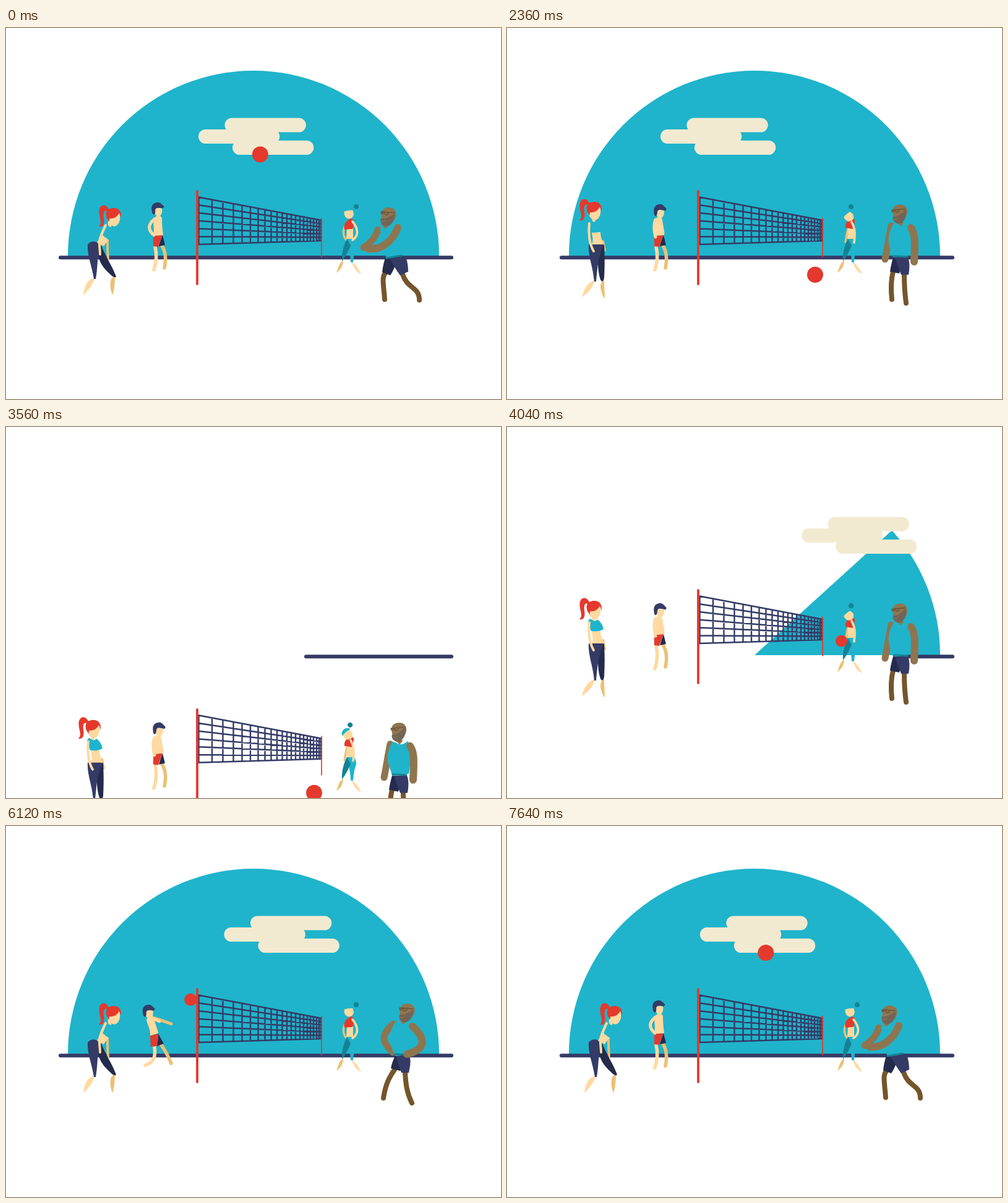
These frames come from a looping animation (800 by 600 pixels, 7680 ms). An HTML page:

```html
<!DOCTYPE html>
<html lang="en">
<head>
<meta charset="utf-8">
<title>Beach volleyball</title>
<style>
  html, body { margin: 0; width: 100%; height: 100%; overflow: hidden; background: #fff; }
  svg { display: block; width: 800px; height: 600px; }
</style>
</head>
<body>
<svg id="stage" viewBox="0 0 800 600"></svg>
<script>
const LOOP = 7680;
const RED = '#e4392c', NAVY = '#343b66', DARK = '#242b4d', TEAL = '#1fb4cb', DEEP = '#158294';
const SKIN = '#ffd9a0', SHADE = '#ecc074', BROWN = '#8f754f', LEG = '#75552b', BEARD = '#746457';

const stage = document.getElementById('stage');
const clamp = v => Math.min(1, Math.max(0, v));
const span = (t, a, b) => clamp((t - a) / (b - a));
const smooth = u => u * u * (3 - 2 * u);
const inOut = u => u < .5 ? 2 * u * u : 1 - 2 * (1 - u) ** 2;

function el(tag, attrs, parent = stage) {
  const node = document.createElementNS('http://www.w3.org/2000/svg', tag);
  for (const k in attrs) node.setAttribute(k, attrs[k]);
  parent.appendChild(node);
  return node;
}

// A style is "colour" for a fill or "colour width" for a round stroke.
function shape(style, d, parent) {
  const [color, width] = style.split(' ');
  const paint = width
    ? { fill: 'none', stroke: color, 'stroke-width': width, 'stroke-linecap': 'round', 'stroke-linejoin': 'round' }
    : { fill: color };
  return el('path', { ...paint, d }, parent);
}

const at = (x, y, r = 0) => `translate(${x} ${y}) rotate(${r})`;

function mix(a, b, k) {
  if (a === b || k <= 0) return a;
  if (k >= 1) return b;
  const to = b.match(/-?[\d.]+/g);
  let i = 0;
  return a.replace(/-?[\d.]+/g, n => (+n + (to[i++] - n) * k).toFixed(2));
}

// Backdrop
const sky = shape(TEAL, '');
const cloud = el('g', { fill: '#f2ead0' });
for (const [x, y] of [[42.5, 145.5], [0, 164], [55, 182]])
  el('rect', { x, y, width: 131.3, height: 23, rx: 11.5 }, cloud);
const ground = shape(NAVY + ' 6', '');
const court = el('g', {});

// Each figure: styles of its parts (an array means a rigid head), poses, and blends [start, end, pose].
const redhead = {
  styles: [SHADE + ' 4', SHADE, DARK, SKIN, NAVY, SKIN, SKIN + ' 5', TEAL, [
    [RED, 'M-8 -13C-13 -23 -22 -21 -23.5 -11C-24 2 -17 9 -24 15C-17 17 -14 10 -16 1C-17 -8 -15 -13 -9 -9Z'],
    [SKIN, 'M-10 0C-7 -6 6 -9 9 -7C12 0 10 10 4 14C-2 17 -9 10 -10 0Z'],
    [RED, 'M-12 -2C-14 -10 -8 -15 0 -15C8 -15 13 -10 12 1L9 -7C6 0 -1 3 -7 2L-7 7C-10 4 -12 1 -12 -2Z']
  ], SKIN + ' 4'],
  poses: {
    ready: [
      'M164 343C164 353 164 363 165 373',
      'M176 402C168 402 166 416 172 432C175 424 176 412 176 402Z',
      'M148 353L154 352C160 368 172 385 178 402C176 405 172 402 168 398C158 388 147 378 148 353Z',
      'M143 405C132 405 126 418 125 432C133 424 140 416 143 405Z',
      'M132 350C136 345 142 344 148 347L150 353C148 370 148 390 145 406L142 406C139 385 131 368 132 350Z',
      'M154 333L166 343C162 346 160 350 158 353L147 347C150 342 152 338 154 333Z',
      'M167 315L168 321',
      'M160 317L165 319C167 323 171 322 173 320C173 328 172 336 167 343C162 340 157 336 154 333C156 326 158 321 160 317Z',
      at(174, 306), 'M161 319C156 330 150 342 151 349C151 355 152 360 152 366'],
    reach: [
      'M176 333C182 346 190 352 198 356',
      'M178 402C170 402 169 418 176 433C179 424 179 412 178 402Z',
      'M148 354L157 350C163 365 175 385 181 401C179 405 172 400 168 397C160 390 146 380 146 372Z',
      'M133 403C122 404 116 418 114 431C123 424 130 415 133 403Z',
      'M133 349C137 344 146 345 152 347L153 355C147 372 142 390 136 404L132 404C132 385 132 368 133 349Z',
      'M153 332L167 342C163 347 160 351 157 355L146 346C149 342 151 337 153 332Z',
      'M168 315L170 321',
      'M162 317L167 319C169 323 173 322 175 320C176 328 173 336 168 343C163 340 157 336 153 332C156 326 159 321 162 317Z',
      at(173, 307, -4), 'M164 319C166 334 174 343 181 348C187 353 192 355 198 357'],
    stand: [
      'M155 345C156 350 157 355 158 359',
      'M157 408C149 410 149 424 158 438C158 428 157 418 157 408Z',
      'M148 358L157 350C158 370 158 385 157 404C156 411 153 411 151 407C147 395 146 380 148 358Z',
      'M142 408C131 410 124 422 121 435C131 429 139 420 142 408Z',
      'M132 350C137 349 148 348 156 350L154 356C147 372 146 390 144 410L141 410C139 385 131 370 132 350Z',
      'M137 331L151 330C151 338 154 345 157 350L137 350C140 343 138 337 137 331Z',
      'M140 307L140 312',
      'M134 310L138 312C140 315 144 314 146 311C151 315 155 320 156 327C150 331 142 331 136 330C134 324 131 318 131 314Z',
      at(141, 296), 'M133 316C132 324 132 330 133 338C134 347 136 354 140 361']
  },
  first: 'ready',
  blends: [[100, 780, 'reach'], [1200, 1840, 'stand'], [4100, 4780, 'ready']]
};

const hips = [
  'M252 352C258 362 259 375 256 388', 'M241 354C245 370 242 382 239 391',
  'M253 335L257 351L247 353C249 346 251 340 253 335Z',
  'M238 336L253 335C250 342 248 348 246 354L238 353Z'];
const boy = {
  styles: [SHADE + ' 5', SHADE + ' 5.5', SKIN + ' 5.5', DARK, RED, SKIN, [
    [SKIN, 'M-5 1C-1 -3 4 -2 7 -1C8 6 6 11 1 12C-3 11 -5 7 -5 1Z'],
    [NAVY, 'M-9 4C-12 -6 -6 -11 0 -11C5 -11 6 -8 10 -5C11 -2 8 -1 5 -2C2 -2 -1 -3 -3 -1C-5 3 -2 6 -6 9C-8 8 -9 6 -9 4Z']
  ], SKIN + ' 5'],
  poses: {
    ready: ['M246 310C247 320 247 326 247 332', ...hips,
      'M240 307C243 303 249 302 252 307C252 318 253 327 254 335L238 336C241 326 236 316 240 307Z',
      at(245, 293), 'M240 309C229 318 229 326 239 335'],
    stand: ['M248 312C250 320 251 326 252 332', ...hips,
      'M239 309C243 305 249 304 251 310C252 320 255 328 254 335L238 336C241 326 237 318 239 309Z',
      at(247, 296, 6), 'M240 310C236 320 238 330 240 338'],
    hit: ['M237 310C247 313 257 316 267 320',
      'M250 353C257 362 262 372 267 384', 'M240 357C242 372 240 382 225 387',
      'M246 336L255 352L244 356C245 350 246 343 246 336Z',
      'M233 339L246 336C246 345 245 350 244 356L234 357Z',
      'M227 313C230 308 236 307 239 311C241 320 245 328 246 335L233 339C234 328 228 322 227 313Z',
      at(230.5, 300), 'M236 311C240 313 244 314 248 316']
  },
  first: 'ready',
  blends: [[1250, 1900, 'stand'], [4100, 4780, 'ready'], [5450, 5980, 'hit'], [6300, 7000, 'ready']]
};

const stride = [
  'M545 376C538 380 537 388 534 396C541 391 545 385 545 376Z',
  'M559 378C565 382 570 390 574 398C567 395 561 388 559 378Z',
  'M551 341L563 341C566 348 567 352 565 356C562 364 562 372 561 379L557 379C557 368 554 355 551 341Z',
  'M551 341L557 352C552 364 547 372 543 377C542 365 546 350 551 341Z'];
const server = {
  styles: [SHADE + ' 3.4', SHADE, SKIN, TEAL, DEEP, SKIN, RED, [
    [SKIN, 'M-7 -3C-2 -5 3 -4 6 -5L8 2C7 9 0 12 -5 7C-7 5 -8 0 -7 -3Z'],
    [TEAL, 'M-8 -2C-7 -10 4 -13 9 -4C5 -4 0 -5 -8 -2Z'],
    [DEEP, 'M8 -10A4 4 0 1 1 16 -10A4 4 0 1 1 8 -10Z']
  ], SKIN + ' 3.6'],
  poses: {
    ready: ['M547 322C544 330 545 337 550 343', ...stride,
      'M551 325L561 324L561 341L550 341Z',
      'M557 308L562 310C562 318 561 323 560 325L547 326C545 319 548 313 557 308Z',
      at(554, 299), 'M560 313C570 325 570 336 560 343'],
    stand: ['M551 325C549 333 548 340 547 346', ...stride,
      'M551 324L561 322L563 341L550 341Z',
      'M557 308L562 310C562 318 560 323 559 325L547 323C546 316 550 311 557 308Z',
      at(551.5, 304, -33), 'M557 314C564 326 562 338 561 347'],
    serve: ['M537 330C534 338 530 346 526 352',
      'M546 376C539 380 541 390 538 397C544 392 546 385 546 376Z',
      'M551 377C557 382 562 388 563 396C557 392 553 386 551 377Z',
      'M550 346L563 343C562 350 560 354 558 358C556 365 554 372 552 378L548 378C549 366 549 356 550 346Z',
      'M549 345L553 350C554 360 551 370 548 377C541 376 541 360 549 345Z',
      'M541 334L549 325L563 343L551 345Z',
      'M537 316L549 318C549 324 545 330 541 336L534 333C533 326 534 320 537 316Z',
      at(531, 310, -16), 'M541 320C542 335 536 348 527 354']
  },
  first: 'ready',
  blends: [[1250, 2050, 'stand'], [4150, 4780, 'serve'], [4880, 5500, 'ready']]
};

const upright = [
  'M621 320C616 345 614 360 611 374',
  'M624 394C621 405 620 420 622 439', 'M642 398C642 412 643 430 645 445',
  'M624 371L640 372C638 380 636 390 634 397L619 394C620 386 622 378 624 371Z',
  'M626 371L648 371C651 378 651 388 649 399L637 399C634 391 630 382 628 374Z',
  'M625 316L631 318C637 323 644 320 649 315C655 328 655 350 651 368L624 371C622 358 608 345 625 316Z',
  'M630 314L642 314L636 321Z', 'M625 369L647 370'];
const rightArm = 'M653 323C661 335 659 350 658 378';
const man = {
  styles: [BROWN + ' 11', LEG + ' 8', LEG + ' 8', DARK, NAVY, TEAL, BROWN, DEEP + ' 3', [
    [BROWN, 'M-11 -4C-11 -14 -2 -15 2 -15C10 -15 14 -9 13 -2C12 5 8 10 2 12L-9 8Z'],
    [BEARD, 'M10 -8C13 2 9 14 0 16C-7 16 -12 10 -10 4C-5 6 0 2 2 0C6 -1 8 -5 10 -8Z'],
    [BROWN + ' 1.4', 'M-8 8C-6 10 -3 9 -2 7'],
    ['#675238 1.3', 'M-12 -6L9 -8M-12 -6C-12 -2 -8 -2 -8 -6M-6 -6C-6 -1 0 -1 0 -7']
  ], BROWN + ' 12'],
  poses: {
    hit: ['M601 326C598 338 590 347 578 355',
      'M613 396C607 404 610 412 612 439', 'M641 398C648 422 668 418 668 440',
      'M614 369L632 374C629 385 626 393 621 400L608 395C609 385 611 377 614 369Z',
      'M618 372L646 370C649 378 650 386 650 394L637 400C632 393 626 384 622 376Z',
      'M604 325L613 320C618 326 624 324 629 318C638 330 640 350 640 368L614 373C614 360 612 345 604 325Z',
      'M606 317L621 317L613 325Z', 'M615 372L639 368',
      at(617, 305, 10), 'M633 323C626 342 608 360 586 357'],
    watch: [...upright, at(641.5, 297.5, 12), rightArm],
    stand: [...upright, at(634, 300.5), rightArm],
    rest: ['M626 320C603 340 610 352 625 366',
      'M628 394C618 408 613 420 610 440', 'M645 398C646 418 648 432 656 448',
      'M629 371L645 373C643 382 640 390 637 396L622 392C623 385 626 378 629 371Z',
      'M631 371L652 371C655 380 653 390 651 399L639 399C636 391 632 382 631 374Z',
      'M629 317L636 319C643 323 649 321 655 317C664 332 658 352 652 370L629 372C624 358 612 345 629 317Z',
      'M636 314L650 314L642 321Z', 'M629 369L651 370',
      at(647, 302, 10), 'M657 324C683 348 674 362 648 369']
  },
  first: 'hit',
  blends: [[0, 780, 'watch'], [900, 2100, 'stand'], [4100, 4600, 'watch'], [4600, 5300, 'rest'], [6500, 7160, 'hit']]
};

const team = [boy, server, redhead, man];

function build(fig) {
  const root = el('g', {}, court);
  fig.nodes = fig.styles.map(style => {
    if (typeof style === 'string') return [shape(style, '', root), 'd'];
    const head = el('g', {}, root);
    style.forEach(([s, d]) => shape(s, d, head));
    return [head, 'transform'];
  });
}

function pose(fig, t) {
  let from = fig.poses[fig.first], to = from, k = 0;
  for (const [start, end, name] of fig.blends) {
    if (t < start) break;
    from = to;
    to = fig.poses[name];
    k = smooth(span(t, start, end));
  }
  fig.nodes.forEach(([node, attr], i) => node.setAttribute(attr, mix(from[i], to[i], k)));
}

function buildNet() {
  const topY = x => 273.5 + (x - 311) * 37.5 / 199;
  const lowY = x => 350 - (x - 311) * 6 / 199;
  let d = '';
  for (let i = 0; i <= 6; i++) d += `M311 ${273.5 + i * 12.75}L510 ${311 + i * 5.5}`;
  for (const x of [311.5, 333, 350.5, 367.5, 381.5, 395, 407.5, 418.5, 428.5, 438, 446.5, 454, 461, 468, 475, 481, 487, 492, 497, 502, 506, 509])
    d += `M${x} ${topY(x)}L${x} ${lowY(x)}`;
  shape(NAVY + ' 2.4', d, court);
  shape(RED + ' 1.7', 'M510 307.5L510 370', court);
  shape(RED + ' 3.8', 'M309 264L309 414', court);
}

build(boy);
build(server);
buildNet();
build(redhead);
build(man);
const ball = el('circle', { fill: RED }, court);

// Ball flights: each is a run of [time, x, y, radius].
const flights = [
  [[-550, 572, 345, 12.5], [-480, 541, 312, 12.7], [-40, 418.5, 205, 13], [0, 411, 204.5, 13], [800, 319, 247, 13], [1160, 205, 345, 13]],
  [[1160, 205, 345, 13], [1500, 310, 195, 13], [1700, 385, 225, 13], [1930, 468, 399, 13]],
  [[1930, 468, 399, 13], [2065, 484, 378, 13], [2200, 498, 399, 13]],
  [[2200, 498, 399, 13], [3725, 498, 399, 13]],
  [[3725, 540, 346, 9.5], [4100, 540, 346, 9.5], [4800, 520, 344, 9.5]],
  [[4800, 520, 344, 9.5], [5300, 425, 205, 9.7], [5950, 272, 312, 10]],
  [[5950, 272, 312, 10], [6120, 298, 281, 10], [6600, 425, 190, 11.3], [7130, 572, 345, 12.5]]
];

function flight(keys, t, c) {
  const n = keys.length - 1;
  const gap = i => keys[i + 1][0] - keys[i][0];
  const rate = i => (keys[i + 1][c] - keys[i][c]) / gap(i);
  const inner = i => (rate(i - 1) * gap(i) + rate(i) * gap(i - 1)) / (gap(i - 1) + gap(i));
  const slope = i => {
    if (n === 1) return rate(0);
    if (i === 0) return 1.5 * rate(0) - .5 * inner(1);
    if (i === n) return 1.5 * rate(n - 1) - .5 * inner(n - 1);
    return inner(i);
  };
  let i = 0;
  while (i < n - 1 && t >= keys[i + 1][0]) i++;
  const h = gap(i), u = (t - keys[i][0]) / h, v = 1 - u;
  return v * v * (1 + 2 * u) * keys[i][c] + u * u * (3 - 2 * u) * keys[i + 1][c]
    + h * u * v * (v * slope(i) - u * slope(i + 1));
}

function moveBall(t) {
  const time = t >= 7130 ? t - LOOP : t;
  const keys = flights.find(f => time < f[f.length - 1][0]);
  ['cx', 'cy', 'r'].forEach((name, i) => ball.setAttribute(name, flight(keys, time, i + 1)));
}

function cloudX(t) {
  if (t < 3650) return 311 - .0267 * t - .003 * Math.max(0, t - 3180) ** 2;
  return 352.5 - .0267 * (t - 6120) + 382 * Math.exp((3650 - t) / 200)
    + 14 * (1 - smooth(span(t, 4400, 5900)));
}

function courtY(t) {
  if (t < 3067) return 0;
  if (t < 3725) return .00079 * (t - 3067) ** 2;
  return 342 * (1 - span(t, 3725, 4000)) ** 3;
}

function skyPath(t) {
  const open = t < 3600 ? 1 - smooth(span(t, 3215, 3530)) : smooth(span(t, 3720, 4740));
  if (open <= 0) return '';
  const a = Math.PI * open;
  return `M400 369L700 369A300 300 0 0 0 ${400 + 300 * Math.cos(a)} ${369 - 300 * Math.sin(a)}Z`;
}

function groundPath(t) {
  const gone = t < 3700 ? span(t, 3160, 3666) ** 2 : 1 - inOut(span(t, 3720, 5012));
  return gone >= 1 ? '' : `M${88 + 632 * gone} 371.3L720 371.3`;
}

function draw(now) {
  const t = now % LOOP;
  sky.setAttribute('d', skyPath(t));
  ground.setAttribute('d', groundPath(t));
  cloud.setAttribute('transform', `translate(${cloudX(t)} 0)`);
  court.setAttribute('transform', `translate(0 ${courtY(t)})`);
  team.forEach(fig => pose(fig, t));
  moveBall(t);
}

const begin = performance.now();
function tick() {
  draw(performance.now() - begin);
  requestAnimationFrame(tick);
}
tick();
</script>
</body>
</html>
```
